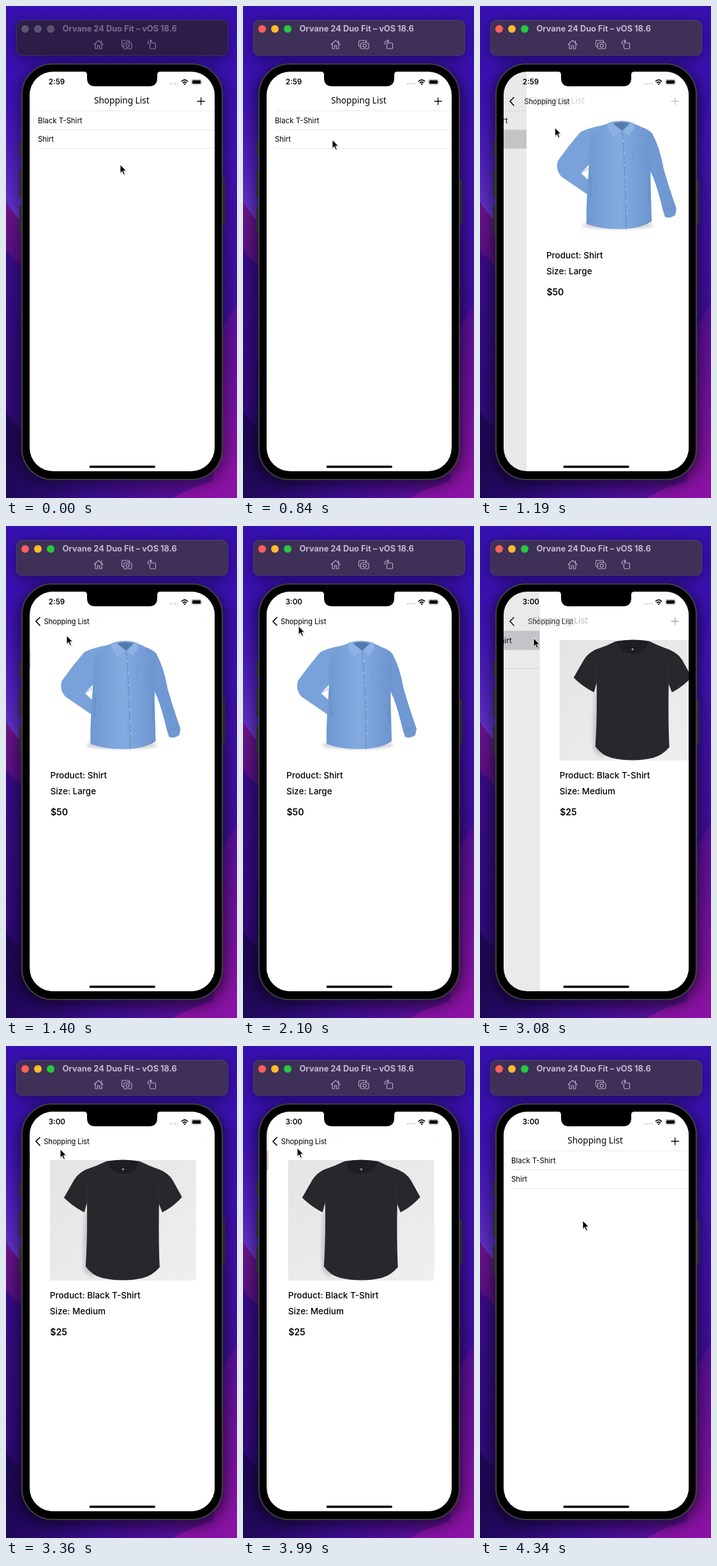
Animation of 362x772 px, one loop 4410 ms. Source, as an HTML page:

```html
<!DOCTYPE html>
<html lang="en">
<head>
<meta charset="utf-8">
<title>Shopping list</title>
<style>
  html, body { margin: 0; width: 100%; height: 100%; overflow: hidden; background: #35109c; }
  svg { display: block; width: 362px; height: 772px; }
  text { font-family: Inter, "Liberation Sans", sans-serif; white-space: pre; }
  .row { font-size: 11.45px; }
  .info { font-size: 13.5px; font-weight: 500; }
  .price { font-size: 14px; font-weight: 600; }
  .title { font: 500 13.6px "Noto Sans", "Open Sans", sans-serif; }
  .line { stroke: #e4e4e6; stroke-width: .8; }
  .icon { fill: none; stroke-width: 1.1; stroke-linejoin: round; stroke-linecap: round; }
</style>
</head>
<body>
<svg viewBox="0 0 362 772">
  <defs>
    <linearGradient id="sky" x1="0" y1="0" x2="0" y2="1">
      <stop offset="0" stop-color="#3610ae"/>
      <stop offset=".3" stop-color="#4012b4"/>
      <stop offset=".6" stop-color="#400f9e"/>
      <stop offset="1" stop-color="#360e8c"/>
    </linearGradient>
    <linearGradient id="glow" x1="0" y1="0" x2="0" y2="1">
      <stop offset="0" stop-color="#4a1cc4" stop-opacity="0"/>
      <stop offset="1" stop-color="#7444d6"/>
    </linearGradient>
    <linearGradient id="wave" x1="0" y1="0" x2="0" y2="1">
      <stop offset="0" stop-color="#6c148e"/>
      <stop offset="1" stop-color="#4c0e80"/>
    </linearGradient>
    <linearGradient id="deep" x1="0" y1="0" x2="0" y2="1">
      <stop offset="0" stop-color="#3a0c8a"/>
      <stop offset="1" stop-color="#2c0a74"/>
    </linearGradient>
    <linearGradient id="floor">
      <stop offset="0" stop-color="#1e0856"/>
      <stop offset=".4" stop-color="#3a0d8c"/>
      <stop offset="1" stop-color="#6c109e"/>
    </linearGradient>
    <linearGradient id="side" x1="0" y1="0" x2="0" y2="1">
      <stop offset="0" stop-color="#56109c"/>
      <stop offset="1" stop-color="#9014a6"/>
    </linearGradient>
    <linearGradient id="cloth">
      <stop offset="0" stop-color="#6f98d2"/>
      <stop offset=".5" stop-color="#84abe0"/>
      <stop offset="1" stop-color="#6c94ce"/>
    </linearGradient>
    <linearGradient id="studio" x1="0" y1="0" x2="1" y2="1">
      <stop offset="0" stop-color="#e4e4e5"/>
      <stop offset="1" stop-color="#efefef"/>
    </linearGradient>
    <filter id="soft" x="-30%" y="-30%" width="160%" height="160%"><feGaussianBlur stdDeviation="12"/></filter>
    <filter id="haze" x="-20%" y="-100%" width="140%" height="300%"><feGaussianBlur stdDeviation="2.5"/></filter>
    <clipPath id="screen"><rect x="37" y="103" width="290" height="627" rx="37"/></clipPath>
  </defs>

  <!-- desktop -->
  <rect width="362" height="772" fill="url(#sky)"/>
  <path d="M0 120H40V370L0 308Z" fill="url(#glow)"/>
  <path d="M0 308L40 362V450H0Z" fill="url(#wave)"/>
  <path d="M0 384L40 424V700H0Z" fill="url(#deep)"/>
  <path d="M0 638L40 680L130 740L362 700V772H0Z" fill="url(#floor)"/>
  <path d="M325 525Q345 495 362 468V772H325Z" fill="url(#side)"/>
  <path d="M262 772Q300 748 362 738V772Z" fill="#8812a4"/>

  <!-- window bar -->
  <rect x="16" y="28" width="332" height="56" rx="12" opacity=".4" filter="url(#soft)"/>
  <rect id="bar" x="16" y="22" width="332" height="56" rx="9.500"/>
  <rect x="16.400" y="22.400" width="331.200" height="55.200" rx="9.200" fill="none" stroke="#7d7090" stroke-opacity=".4" stroke-width=".7"/>
  <g id="lights"><circle cx="30" cy="36" r="6"/><circle cx="50" cy="36" r="6"/><circle cx="70" cy="36" r="6"/></g>
  <text id="name" x="88.5" y="40" font-size="12.8" font-weight="700">Orvane 24 Duo Fit – vOS 18.6</text>
  <g id="icons" class="icon">
    <path d="M138 60.500L145 54L152 60.500M140 59V67H143.500V62H146.500V67H150V59M149.500 57.500V54.500"/>
    <path d="M184 64H183Q181.500 64 181.500 62.500V55.500Q181.500 54 183 54H192Q193.500 54 193.500 55.500V56.500"/>
    <path d="M186 58H188L189 56.800H192.500L193.500 58H195.500Q197 58 197 59.500V65.500Q197 67 195.500 67H186Q184.500 67 184.500 65.500V59.500Q184.500 58 186 58Z"/>
    <circle cx="190.700" cy="62.300" r="2.500"/>
    <rect x="225.500" y="58" width="9" height="9" rx="1.200"/>
    <path d="M222.500 60V57Q222.500 55 224.500 55H228M226.300 53L228.300 55L226.300 57"/>
  </g>

  <!-- phone body -->
  <rect id="shade" x="20" y="96" width="324" height="656" rx="48" filter="url(#soft)"/>
  <g fill="#2c2a34">
    <rect x="20.500" y="213" width="5" height="23" rx="1.500"/>
    <rect x="20.500" y="256" width="5" height="44" rx="1.500"/>
    <rect x="20.500" y="314" width="5" height="44" rx="1.500"/>
    <rect x="338.500" y="272" width="5" height="71" rx="1.500"/>
  </g>
  <rect x="25" y="91" width="314" height="652" rx="48" fill="#000" stroke="#3d3d41" stroke-width="2.200"/>

  <g clip-path="url(#screen)">
    <rect x="37" y="103" width="290" height="627" fill="#fff"/>
    <g id="list">
      <rect id="pick" x="37" width="290" height="29.500" fill="#d6d6da"/>
      <path class="line" d="M51 164.500H327M51 194.300H327M51 223.500H327"/>
      <text class="row" x="50" y="183.600">Black T-Shirt</text>
      <text class="row" x="50" y="213.200">Shirt</text>
    </g>
    <rect id="dim" x="37" y="103" width="290" height="627"/>
    <g id="detail">
      <rect x="37" y="103" width="290" height="627" fill="#fff"/>
      <g id="shirt">
        <ellipse cx="180" cy="344" rx="56" ry="6" fill="#b9b9bd" opacity=".7" filter="url(#haze)"/>
        <path d="M206 187Q226 191 234 200Q246 222 252 256Q262 290 272 318L270 328Q262 334 254 331L250 318Q244 292 236 270L222 240Z" fill="#7098d2"/>
        <path d="M165 186Q136 190 121 198Q102 220 86 243Q82 258 92 268L140 301Q148 303 152 290L122 262L144 240Z" fill="#7aa2da"/>
        <path d="M165 184Q146 190 138 203Q133 220 135 250Q130 310 131 342Q156 351 184 350Q214 350 233 338Q232 290 231 262Q236 230 232 205Q222 190 204 184Q185 200 165 184Z" fill="url(#cloth)"/>
        <path d="M165 183Q185 177 204 183L206 191L198 204L187 196L173 205L164 191Z" fill="#8db2e4"/>
        <path d="M172 184Q186 180 199 184L187 196Z" fill="#5579b0"/>
        <path d="M187 196Q192 260 193 350M135 250Q140 275 137 300M231 262Q226 290 230 310M122 262L134 255M251 321L269 316M138 298L146 284" fill="none" stroke="#5f87c0" stroke-width=".9"/>
        <path d="M203 222H225V246L214 251L204 246Z" fill="none" stroke="#6d95cf" stroke-width=".8"/>
        <path d="M189 212Q193 270 194 340" fill="none" stroke="#d9e6f8" stroke-width="1.800" stroke-linecap="round" stroke-dasharray="0 19"/>
      </g>
      <g id="tee">
        <rect x="68" y="179" width="229" height="189" fill="url(#studio)"/>
        <path d="M123 262Q118 320 122 354L136 364L140 250Z" fill="#c9c9cb" filter="url(#haze)"/>
        <path d="M156 181Q182 190 209 181Q225 189 240 194Q254 200 260 210L275 237Q262 252 244 261L239 248Q238 310 240 347Q229 360 214 364Q183 371 150 364Q134 360 124 346Q127 300 126 246L122 261Q104 252 90 238L106 210Q112 200 124 194Q140 189 156 181Z" fill="#28272b"/>
        <path d="M156 181Q182 176 209 181Q203 202 183 202Q162 202 156 181Z" fill="#1e1d22"/>
        <path d="M156 181Q162 202 183 202Q203 202 209 181M126 246Q128 225 124 210M239 248Q236 225 240 210" fill="none" stroke="#36353a" stroke-width=".8"/>
        <rect x="181" y="192" width="3" height="3" fill="#8a8a8c"/>
      </g>
      <text class="info" id="product" x="68" y="396"></text>
      <text class="info" id="size" x="68" y="421.200"></text>
      <text class="price" id="price" x="68.500" y="453.500"></text>
    </g>

    <!-- navigation bar -->
    <text class="title" id="title" x="138" y="153">Shopping List</text>
    <path id="plus" d="M299.500 149.500H311.700M305.600 143.400V155.600" stroke="#000" stroke-width="1.300"/>
    <path id="chevron" d="M53 143.500L47 149.700L53 156" fill="none" stroke="#000" stroke-width="1.700" stroke-linecap="round" stroke-linejoin="round"/>
    <text id="back" x="59" y="153.800" font-size="11.300" letter-spacing="-.12">Shopping List</text>

    <!-- status bar -->
    <path d="M122 103Q127 103 127 108V113Q127 126 140 126H224Q237 126 237 113V108Q237 103 242 103Z"/>
    <text id="clock" x="66.800" y="123.400" font-size="11.500" font-weight="600"></text>
    <path d="M258 122H271" stroke="#bdbdbf" stroke-width="2" stroke-linecap="round" stroke-dasharray="0 3.800"/>
    <path d="M275 118.300Q280 113.500 285 118.300M277 120.700Q280 117.800 283 120.700" fill="none" stroke="#000" stroke-width="1.700"/>
    <path d="M278.200 122.200Q280 120.600 281.800 122.200L280 124Z"/>
    <rect x="290.700" y="115.300" width="15.600" height="8" rx="2.400" fill="none" stroke="#9b9b9d" stroke-width=".8"/>
    <rect x="291.900" y="116.500" width="13.200" height="5.600" rx="1.400"/>
    <path d="M307.300 118V120.700Q308.600 119.400 307.300 118Z" fill="#9b9b9d"/>
    <rect x="130.500" y="721.300" width="103.500" height="3.400" rx="1.700"/>
  </g>

  <g id="cursor">
    <path d="M.5 2V15L3.700 12L5.800 17L8.200 16L6 11H10.300Z" opacity=".22"/>
    <path d="M0 0V13.300L3 10.500L5.100 15.500L7.300 14.500L5.200 9.700H9.400Z" stroke="#fff" stroke-width=".9"/>
  </g>
</svg>

<script>
const LOOP = 4410, STEP = 70, WIDTH = 290, SHIFT = 87;
const WAKE = 350, MINUTE = 1610;

const items = {
  shirt: { product: "Shirt", size: "Large", price: "$50", rowY: 194.3 },
  tee: { product: "Black T-Shirt", size: "Medium", price: "$25", rowY: 164.7 }
};

// start time, item shown, 1 = push / 0 = pop
const moves = [
  [989, "shirt", 1], [2139, "shirt", 0],
  [2912, "tee", 1], [3982, "tee", 0]
];

// time, x, y of the pointer tip
const pointer = [
  [0, 179, 249], [350, 179, 249], [770, 140, 210], [980, 140, 210],
  [1400, 95, 172], [1820, 87, 157], [2450, 87, 157], [2800, 84, 176],
  [3080, 84, 176], [3360, 85, 162], [4000, 85, 160], [4340, 161, 274], [4410, 161, 274]
];

const $ = id => document.getElementById(id);
const set = (id, attrs) => {
  for (const key in attrs) $(id).setAttribute(key, attrs[key]);
};
const slide = (id, x, y = 0) => set(id, { transform: `translate(${x} ${y})` });
const clamp = v => Math.max(0, Math.min(1, v));
const ease = v => v * v * (3 - 2 * v);

// critically damped spring from 0 to 1
function spring(ms) {
  const x = Math.max(0, ms) * 0.018;
  return 1 - (1 + x) * Math.exp(-x);
}

function pointerAt(t) {
  const i = pointer.findIndex(k => k[0] > t);
  const [t0, x0, y0] = pointer[i - 1], [t1, x1, y1] = pointer[i];
  const u = ease((t - t0) / (t1 - t0));
  return [x0 + (x1 - x0) * u, y0 + (y1 - y0) * u];
}

function drawWindow(awake) {
  set("bar", { fill: awake ? "#3f3058" : "#2c1d48" });
  const colors = awake ? ["#ff5f57", "#febc2e", "#28c840"] : Array(3).fill("#5e5470");
  [...$("lights").children].forEach((dot, i) => dot.setAttribute("fill", colors[i]));
  set("name", { fill: awake ? "#c4b9d4" : "#7a6e8c" });
  set("icons", { stroke: awake ? "#b9adcb" : "#8b7fa0" });
  set("shade", { opacity: awake ? 0.6 : 0.45 });
}

function drawScreen(t) {
  const last = moves.filter(m => t >= m[0] - STEP).pop();
  const [start, key, push] = last || [0, "shirt", 0];
  const s = last ? spring(t - start) : 1;
  const p = push ? s : 1 - s;
  const item = items[key];

  slide("list", -SHIFT * p);
  slide("detail", WIDTH * (1 - p));
  set("dim", { opacity: 0.1 * p });
  set("pick", { y: item.rowY, opacity: push ? 1 : p, width: WIDTH + SHIFT });

  set("shirt", { display: key === "shirt" ? "inline" : "none" });
  set("tee", { display: key === "tee" ? "inline" : "none" });
  $("product").textContent = "Product: " + item.product;
  $("size").textContent = "Size: " + item.size;
  $("price").textContent = item.price;

  slide("title", -69 * p);
  set("title", { opacity: clamp(1.4 * (1 - p)) });
  set("plus", { opacity: clamp(1.8 * (1 - p)) });
  slide("back", 82 * (1 - p));
  set("back", { opacity: clamp(p * p * 1.2 - 0.02) });
  set("chevron", { opacity: clamp(p * 1.1 - 0.03) });
}

function draw(t) {
  drawWindow(t >= WAKE);
  drawScreen(t);
  $("clock").textContent = t < MINUTE ? "2:59" : "3:00";
  slide("cursor", ...pointerAt(t));
}

const begin = performance.now();
function tick() {
  const t = (performance.now() - begin) % LOOP;
  draw(Math.floor(t / STEP) * STEP);
  requestAnimationFrame(tick);
}
tick();
</script>
</body>
</html>
```
